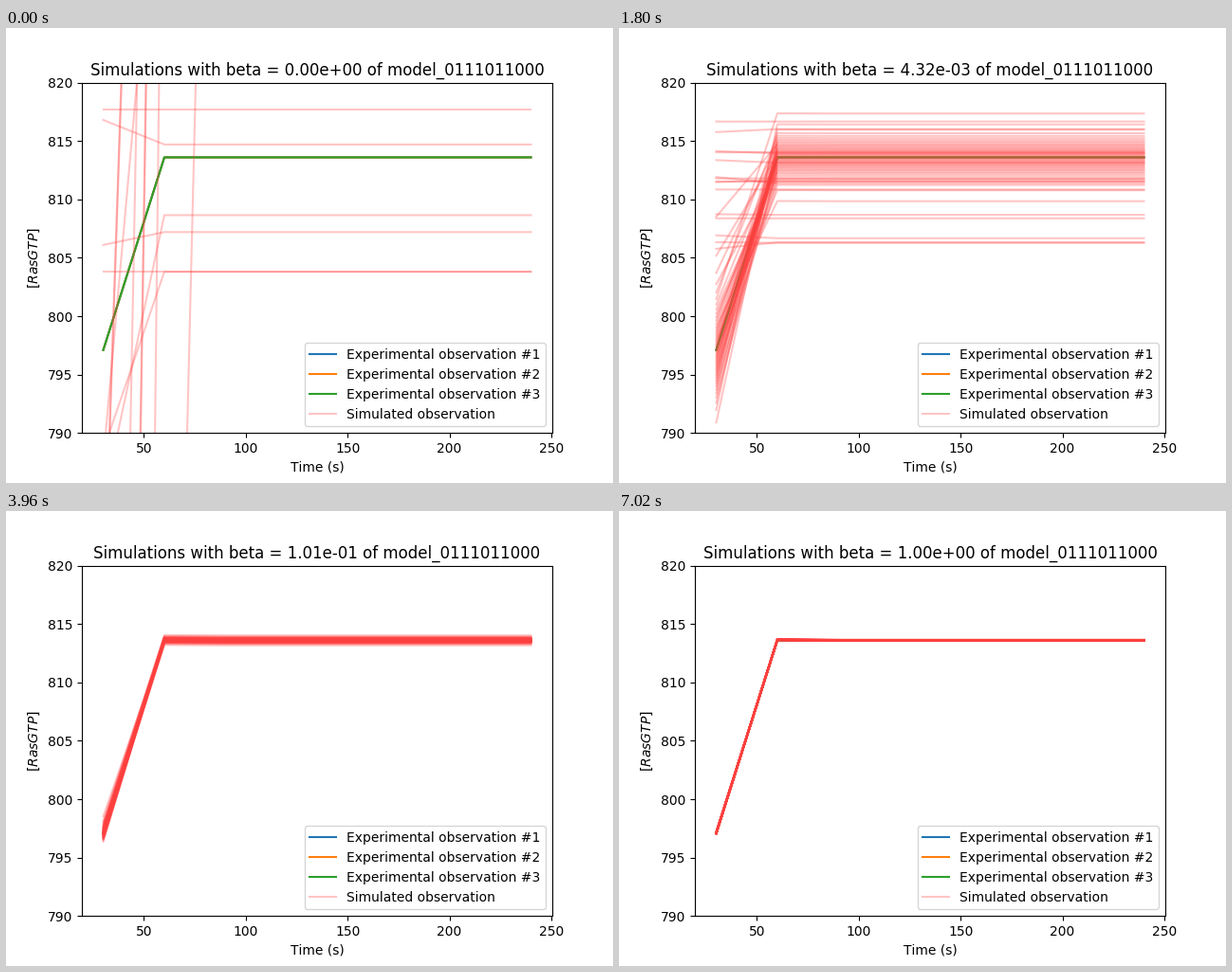
A matplotlib script for the animation above (7200 ms loop, 640 by 480 pixels).

```python
import numpy as np
import matplotlib.pyplot as plt
from matplotlib.animation import FuncAnimation
from matplotlib.collections import LineCollection

plt.rcParams["text.kerning_factor"] = 6

FRAMES, LOOP_MS = 40, 7200
CURVES = 60
TIMES = np.arange(30, 241, 30)
START, END = 797.1, 813.6
RED, ALPHA = "#ff4040", 0.3


def curve(y30, y60, plateau):
    """Value at 30 s, value at 60 s, then a plateau from 90 s on."""
    y = np.full(len(TIMES), plateau)
    y[:2] = y30, y60
    return np.column_stack([TIMES, y])


def steep(t_low, t_high):
    """Straight line crossing 790 at t_low and 820 at t_high."""
    slope = 30 / (t_high - t_low)
    t = np.array([t_low - 2, t_high + 2])
    return np.column_stack([t, 790 + slope * (t - t_low)])


def bell(rng, n):
    """Evenly covered bell-shaped sample in random order."""
    p = (rng.permutation(n) + 0.5) / n
    return 0.55 * np.log(p / (1 - p))


def prior():
    """Beta of zero: most curves miss the view or cross it steeply."""
    levels = [(817.67, 817.67), (803.8, 803.8), (816.8, 814.7),
              (784.2, 808.65), (806.1, 807.2), (788.5, 803.8)]
    crossings = [(33, 38.8), (33.2, 39), (31.2, 46.5), (43.3, 46.6),
                 (48.2, 50.9), (48.4, 51.1), (55.4, 57.4), (71.2, 75.4)]
    return ([curve(a, b, b) for a, b in levels]
            + [steep(*c) for c in crossings])


def posterior(rng, i, beta):
    """Flat curves die out while the rest gather on the observations."""
    loose = 1 + max(6 - i, 0)
    n_flat = int(CURVES * max(13 - i, 0) / 12)
    n = CURVES - n_flat

    flat = 811.5 + loose * (12 - 0.6 * i) * rng.uniform(-1, 1, n_flat)
    drift = 0.1 * rng.normal(size=n_flat) ** 3

    s30 = 0.05 * beta ** -0.95
    s60 = 0.024 * beta ** -0.85
    z = bell(rng, n)
    y30 = START + loose * s30 / (1 + s30 / 6) * (z + 0.12 * z ** 2)
    plateau = END + loose * s60 / (1 + s60 / 4) * bell(rng, n)
    y60 = plateau + 0.05 * i / FRAMES

    return ([curve(v + d, v, v) for v, d in zip(flat, drift)]
            + [curve(*v) for v in zip(y30, y60, plateau)])


fig, ax = plt.subplots(figsize=(6.4, 4.8), dpi=100)
observed = curve(START, END, END)
for k in (1, 2, 3):
    ax.plot(*observed.T, label=f"Experimental observation #{k}")
ax.plot([], [], color=RED, alpha=ALPHA, label="Simulated observation")
sims = LineCollection([], colors=RED, alpha=ALPHA, linewidths=1.5, zorder=2.1,
                      capstyle="projecting", joinstyle="round")
ax.add_collection(sims, autolim=False)
ax.set(xlim=(19.5, 250.5), ylim=(790, 820), xlabel="Time (s)",
       ylabel="$[RasGTP]$")
ax.legend(loc="lower right")


def update(i):
    beta = (i / (FRAMES - 1)) ** 4
    rng = np.random.default_rng(100 + i)
    sims.set_segments(posterior(rng, i, beta) if i else prior())
    ax.set_title(f"Simulations with beta = {beta:.2e} of model_0111011000")
    return sims, ax.title


anim = FuncAnimation(fig, update, frames=FRAMES, interval=LOOP_MS / FRAMES,
                     repeat=True, repeat_delay=0, blit=False)
plt.show()
```
